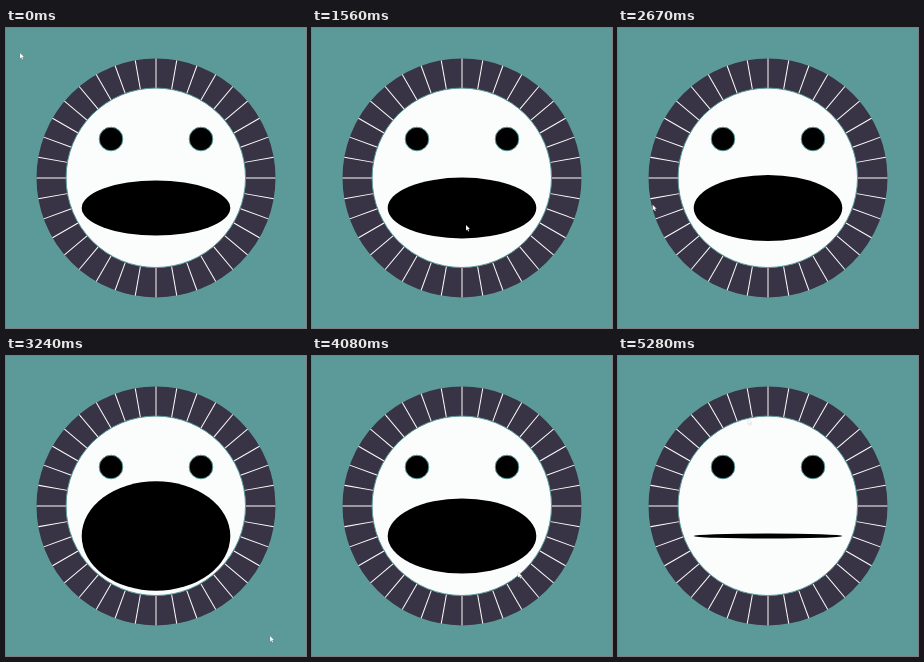
Recreate the animation shown at these times as an HTML page. Size 300x300 px, loop 5.31 s.

```html
<!DOCTYPE html>
<html lang="en">
<head>
<meta charset="utf-8">
<title>Talking face</title>
<style>
  html, body { margin: 0; height: 100%; overflow: hidden; background: #5c9a99; }
  svg { display: block; width: 100vw; height: 100vh; }
</style>
</head>
<body>
<svg viewBox="0 0 300 300">
  <circle cx="150" cy="150" r="104.5" fill="none" stroke="#393445" stroke-width="30"/>
  <g id="spokes" stroke="#fbfdfc"></g>
  <g stroke="#5c9a99">
    <circle cx="149.8" cy="149.8" r="89.7" fill="#fbfdfc"/>
    <circle cx="105" cy="111" r="11.8"/>
    <circle cx="195" cy="111" r="11.8"/>
  </g>
  <ellipse id="mouth" cx="150" cy="180" rx="74.3"/>
  <path id="pointer" d="M0 0V5.5L1.3 4.4L2.3 6.5L3.2 6L2.2 4H4Z"
        fill="#fff" stroke="#333" stroke-opacity=".25" stroke-width=".4"/>
</svg>
<script>
const LOOP = 5310, STEP = 30;
const WIDEST = 56;
const REST = { x: 130, y: 63 }; // the mouth is shut while the pointer is here
const $ = id => document.getElementById(id);

// pointer path: time, x, y
const path = [
  [330, 14, 25],
  [690, 250, 48],
  [870, 294, 70],
  [1410, 150, 20],
  [1560, 154, 197],
  [2130, 280, 298],
  [2700, 21, 170],
  [3240, 264, 280],
  [3780, 14, 180],
  [4080, 206, 216],
  [4260, 200, 290],
  [4680, 170, 13],
  [5280, REST.x, REST.y]
];

function pointerAt(t) {
  const i = path.findIndex(p => p[0] >= t);
  const [t1, x1, y1] = path[i];
  const [t0, x0, y0] = path[Math.max(i - 1, 0)];
  const f = t1 > t0 ? (t - t0) / (t1 - t0) : 0;
  return [x0 + (x1 - x0) * f, y0 + (y1 - y0) * f];
}

for (let angle = 0; angle < 360; angle += 10) {
  const spoke = document.createElementNS("http://www.w3.org/2000/svg", "path");
  spoke.setAttribute("d", "M150 30.5V60");
  spoke.setAttribute("transform", `rotate(${angle} 150 150)`);
  $("spokes").append(spoke);
}

function draw() {
  const now = performance.now() % LOOP;
  const [x, y] = pointerAt(Math.floor(now / STEP) * STEP);
  const reach = Math.hypot(x - REST.x, y - REST.y);
  $("mouth").setAttribute("ry", Math.min(2.5 + 0.205 * reach, WIDEST));
  $("pointer").setAttribute("transform", `translate(${x} ${y})`);
  requestAnimationFrame(draw);
}
draw();
</script>
</body>
</html>
```
